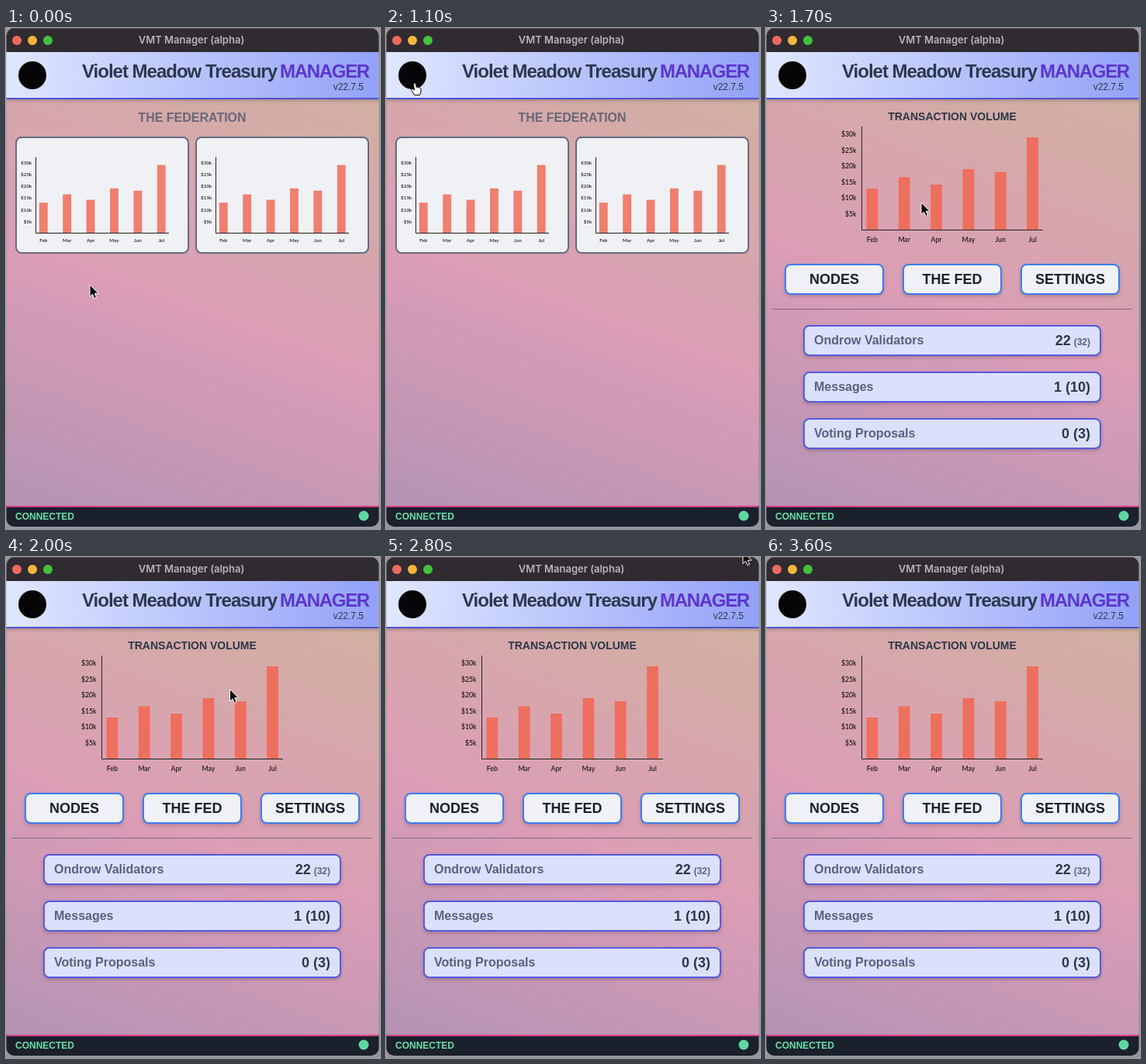
Recreate the animation shown at these times as an HTML page. Size 482 px wide and 646 px high, loop 3700 ms.

```html
<!DOCTYPE html>
<html lang="en">
<head>
<meta charset="utf-8">
<title>VMT Manager</title>
<style>
  html, body { margin: 0; width: 100%; height: 100%; overflow: hidden; background: #98969b; }
  svg { display: block; font-family: "Liberation Sans", Arial, sans-serif; font-weight: bold; }
  .window { clip-path: inset(0 1.5px 3px .5px round 10px); }
  .bar-title { font: 600 13px Inter, sans-serif; }
  .brand { font-size: 24px; letter-spacing: -1px; }
  .role { font-size: 24px; letter-spacing: -1.3px; }
  .chart { font: 500 8.7px Lato, sans-serif; }
  .raised { filter: drop-shadow(0 2px 2px #0003); }
</style>
</head>
<body>
<svg width="482" height="646" viewBox="0 0 482 646">
  <defs>
    <linearGradient id="head">
      <stop stop-color="#e0e7ff"/><stop offset="1" stop-color="#92a1f8"/>
    </linearGradient>
    <!-- runs at 20 degrees from the vertical -->
    <linearGradient id="back" gradientUnits="userSpaceOnUse" x1="127" y1="664" x2="353" y2="46">
      <stop stop-color="#b493b4"/><stop offset=".48" stop-color="#db9db6"/><stop offset="1" stop-color="#d2b0a2"/>
    </linearGradient>
  </defs>
  <g class="window">
    <rect width="482" height="646" fill="url(#back)"/>
    <g id="federation"></g>
    <g id="dashboard"></g>

    <rect width="482" height="31" fill="#2f2b31"/>
    <path d="M0 .5H482" stroke="#57535a"/>
    <circle cx="14" cy="16" r="6" fill="#ee6a5f"/>
    <circle cx="34" cy="16" r="6" fill="#f5b53c"/>
    <circle cx="54" cy="16" r="6" fill="#45c03f"/>
    <text class="bar-title" x="239" y="20" text-anchor="middle" fill="#b9b6ba">VMT Manager (alpha)</text>

    <g class="raised">
      <rect y="31" width="482" height="60" fill="url(#head)"/>
      <path d="M0 91H482" stroke="#4f54dc" stroke-width="2"/>
    </g>
    <circle cx="34" cy="61" r="18" fill="#050507"/>
    <text class="brand" x="98" y="64" fill="#2d3750">Violet Meadow Treasury</text>
    <text class="role" x="353" y="64" fill="#5c35d0">MANAGER</text>
    <text x="461" y="80" text-anchor="end" font-size="12" font-weight="400" fill="#2d3748">v22.7.5</text>

    <rect y="616" width="482" height="30" fill="#1a202c"/>
    <path d="M0 617H482" stroke="#d83f87" stroke-width="2"/>
    <text x="12" y="634" font-size="12" fill="#68dfa6">CONNECTED</text>
    <circle cx="461" cy="629" r="6.5" fill="#5fd8a0"/>
  </g>
  <path id="arrow" d="M0 0V15.5L3.5 12.3 5.9 17.6 8.5 16.4 6.2 11.2H11Z" fill="#000" stroke="#fff"/>
  <path id="hand" d="M-1.5 1Q0-1.4 1.5 1L2.2 5.4Q3.6 4.2 4.5 5.8 6 4.9 6.7 6.5 8 6 8.2 7.8L7.8 12 6.5 15.4H-.4L-2.4 11.8-4.5 8.7Q-4.7 6.7-2.5 7.4L-.6 9Z" fill="#fff" stroke="#000"/>
</svg>
<script>
const $ = id => document.getElementById(id);
const months = ["Feb", "Mar", "Apr", "May", "Jun", "Jul"];
const heights = [53.5, 68, 58.5, 78.5, 74.5, 119.5];

const text = (x, y, size, fill, str, anchor = "start") =>
  `<text x="${x}" y="${y}" font-size="${size}" fill="${fill}" text-anchor="${anchor}">${str}</text>`;

const box = (x, y, w, h, fill, stroke, cls = "") =>
  `<rect class="${cls}" x="${x + 1}" y="${y + 1}" width="${w - 2}" height="${h - 2}" rx="7" fill="${fill}" stroke="${stroke}" stroke-width="2"/>`;

// The origin of a chart is where its axes meet.
function chart(x, y, scale, fill) {
  const bars = heights.map((h, i) => {
    const left = 5.9 + i * 41.35;
    return `<rect x="${left}" y="${-h}" width="14.8" height="${h}" fill="${fill}"/>
      <text x="${left + 7.4}" y="15.5" text-anchor="middle">${months[i]}</text>
      <text x="-7" y="${-17.5 - i * 20.6}" text-anchor="end">$${5 + i * 5}k</text>`;
  });
  return `<g class="chart" fill="#111" transform="translate(${x} ${y}) scale(${scale})">${bars.join("")}
    <path d="M0-133.5V0H233.5" fill="none" stroke="#222" vector-effect="non-scaling-stroke"/></g>`;
}

$("federation").innerHTML = text(240, 121, 16, "#686779", "THE FEDERATION", "middle") +
  [0, 232].map(dx => box(12 + dx, 140, 224, 151, "#f0f1f5", "#636b80") +
    chart(38.5 + dx, 264.5, .735, "#ef7f6e")).join("");

const buttons = ["NODES", "THE FED", "SETTINGS"].map((label, i) =>
  box(24 + i * 152, 304, 128, 40, "#f0f2f7", "#3b7df0", "raised") +
  text(88 + i * 152, 330, 18, "#1a202c", label, "middle"));

const small = `22<tspan dx="4" font-size="12" fill="#5b6280">(32)</tspan>`;
const rows = [["Ondrow Validators", small], ["Messages", "1 (10)"], ["Voting Proposals", "0 (3)"]]
  .map(([label, value], i) => {
    const y = 383 + i * 60;
    return box(48, y, 384, 40, "#dbe1fd", "#5759e2", "raised") +
      text(62, y + 25, 16, "#596080", label) + text(418, y + 26, 18, "#2d3748", value, "end");
  });

$("dashboard").innerHTML = text(240, 119, 14, "#2d3748", "TRANSACTION VOLUME", "middle") +
  chart(123.5, 260.5, 1, "#ee6f5e") + buttons.join("") +
  `<path d="M8 362.5H472" stroke="#7b6a7d"/>` + rows.join("");

// Pointer path: time, x, y
const path = [[0, 108, 331], [100, 108, 331], [700, 37, 71], [1300, 37, 71],
  [1700, 200, 225], [2300, 377, 116], [2800, 460, -7], [3000, 472, -30], [3700, 472, -30]];

function pointer(t) {
  const i = path.findIndex(p => p[0] > t);
  const [t0, x0, y0] = path[i - 1], [t1, x1, y1] = path[i];
  const u = (t - t0) / (t1 - t0), k = u * u * (3 - 2 * u);
  return [x0 + (x1 - x0) * k, y0 + (y1 - y0) * k];
}

const show = (id, on) => $(id).style.display = on ? "" : "none";
const start = performance.now();

function draw() {
  const t = Math.floor((performance.now() - start) % 3700 / 100) * 100;
  const [x, y] = pointer(t);
  const onLogo = Math.hypot(x - 34, y - 61) < 24;
  show("federation", t < 1200);
  show("dashboard", t >= 1200);
  show("hand", onLogo);
  show("arrow", !onLogo);
  for (const id of ["hand", "arrow"]) $(id).setAttribute("transform", `translate(${x} ${y})`);
  requestAnimationFrame(draw);
}
draw();
</script>
</body>
</html>
```
